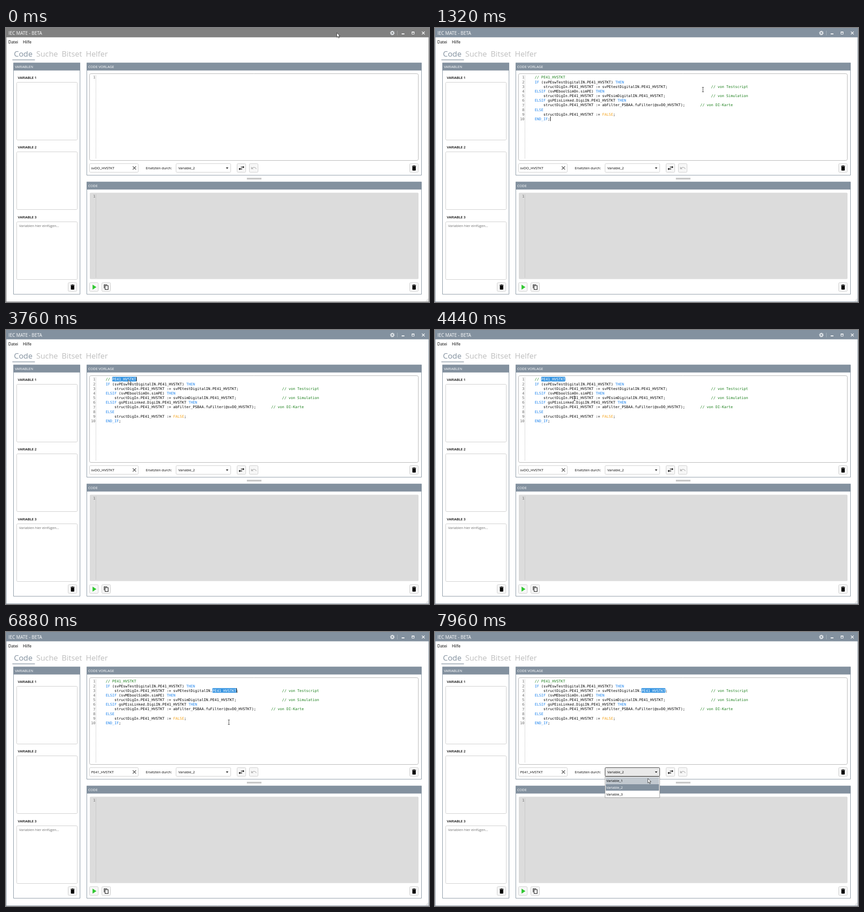
Animation, 929 px wide and 603 px high, one loop 8 s. Source, as an HTML page with a canvas:

```html
<!DOCTYPE html>
<html lang="de">
<head>
<meta charset="utf-8">
<title>IEC MATE - BETA</title>
<style>
html, body { margin: 0; width: 100%; height: 100%; overflow: hidden; background: #fff; }
canvas { display: block; }
</style>
</head>
<body>
<canvas id="stage" width="929" height="603"></canvas>
<script>
const ctx = document.getElementById('stage').getContext('2d');
const LOOP = 8000, STEP = 40, BLINK = 320;
const UI = '"Open Sans", "Noto Sans", sans-serif';
const MONO = '7.94px "DejaVu Sans Mono", "Noto Sans Mono", monospace';
const STEEL = '#83919f', LINE = '#cccccc', SMALL = 7.55;
const CODE_X = 199.9, CODE_Y = 103.1, CHAR = 4.782, ROW = 10.2;

// moments of the story
const FOCUS = 440, PASTE = 1320, DRAG = 2640, DRAG_END = 3480,
      CLICK = 5160, DOUBLE = 5280, FIND = 6880, OPEN = 7600;

const pad = ' '.repeat(4);
const note = (s, col, comment) => pad + s.padEnd(col) + '// von ' + comment;
const assign = 'structDigIn.PE41_HVSTKT := ';
const code = [
  '// PE41_HVSTKT',
  'IF (svPEswTestDigitalIN.PE41_HVSTKT) THEN',
  note(assign + 'svPEtestDigitalIN.PE41_HVSTKT;', 77, 'Testscript'),
  'ELSIF (svMEboolSimOn.simPE) THEN',
  note(assign + 'svPEsimDigitalIN.PE41_HVSTKT;', 77, 'Simulation'),
  'ELSIF gsPEisLinked.DigiIN.PE41_HVSTKT THEN',
  note(assign + 'abFilter_PSBAA.fuFilter(@svDO_HVSTKT);', 72, 'DI-Karte'),
  'ELSE',
  pad + assign + 'FALSE;',
  'END_IF;'
].map(s => pad + s);

// the tag is selected first in the comment, then in the third row
const TAG = 'PE41_HVSTKT';
const tagIn = row => {
  const from = code[row].lastIndexOf(TAG);
  return { row, from, to: from + TAG.length };
};
const firstTag = tagIn(0), secondTag = tagIn(2);

const icons = {
  swap: 'M21,9L17,5V8H10V10H17V13ZM7,11L3,15L7,19V16H14V14H7Z',
  undo: 'M12.5,8C9.8,8 7.5,9 5.6,10.6L2,7V16H11L7.4,12.4C13,8 19,11 20.2,16L22.5,15.2C21,11 17.1,8 12.5,8Z',
  trash: 'M19,4H15.5L14.5,3H9.5L8.5,4H5V6H19ZM6,7V19A2,2 0 0,0 8,21H16A2,2 0 0,0 18,19V7Z',
  play: 'M8,5V19L19,12Z',
  copy: 'M8,7H19V21H8ZM6,5V23H21V5ZM2,1V17H4V3H16V1Z'
};
for (const k in icons) icons[k] = new Path2D(icons[k]);
const arrow = new Path2D('M.5,.5V10.3L2.8,8.2L4.5,12L6.1,11.3L4.5,7.6H7.6Z');

// pointer moves, each easing out towards its end point
const start = { x: 726, y: 10 };
const moves = [
  { at: 80, for: 200, x: 588.5, y: 135.5 },
  { at: 1800, for: 800, x: 236.5, y: 109.5 },
  { at: DRAG, for: 840, x: 292.5, y: 107.5 },
  { at: DRAG_END, for: 840, x: 248, y: 111 },
  { at: 4320, for: 840, x: 467.5, y: 129.5, arc: 45 },
  { at: DOUBLE, for: 360, x: 473.5, y: 141.5 },
  { at: 5920, for: 160, x: 489.5, y: 198.5 },
  { at: FIND, for: 640, x: 484, y: 300 },
  { at: 7760, for: 200, x: 467, y: 322 }
];

// the caret restarts its blinking wherever it is placed
const carets = [
  { at: FOCUS, col: 0, row: 0 },
  { at: PASTE, col: code[9].length, row: 9 },
  { at: DRAG_END, col: firstTag.to, row: 0 },
  { at: CLICK, col: secondTag.from + 3, row: 2 },
  { at: DOUBLE + STEP, col: secondTag.to, row: 2 }
];

const colX = c => CODE_X + c * CHAR;
const rowY = r => CODE_Y + r * ROW;
const clamp = (v, a, b) => Math.max(a, Math.min(b, v));

function fill(x, y, w, h, color) {
  ctx.fillStyle = color;
  ctx.fillRect(x, y, w, h);
}

function round(x, y, w, h, r, color) {
  ctx.fillStyle = color;
  ctx.beginPath();
  ctx.roundRect(x, y, w, h, r);
  ctx.fill();
}

function box(x, y, w, h, stroke, bg = '#fff', r = 0) {
  round(x + .5, y + .5, w - 1, h - 1, r, bg);
  ctx.strokeStyle = stroke;
  ctx.lineWidth = 1;
  ctx.stroke();
}

function text(s, x, y, size, color = '#000', weight = 400) {
  ctx.font = `${weight} ${size}px ${UI}`;
  ctx.fillStyle = color;
  ctx.fillText(s, x, Math.round(y));
}

function lines(color, width, ...segs) {
  ctx.strokeStyle = color;
  ctx.lineWidth = width;
  ctx.beginPath();
  for (const [a, b, c, d] of segs) { ctx.moveTo(a, b); ctx.lineTo(c, d); }
  ctx.stroke();
}

function cross(x, y, r, color, width) {
  lines(color, width, [x - r, y - r, x + r, y + r], [x - r, y + r, x + r, y - r]);
}

function button(name, x, y, scale, color = '#000') {
  box(x, y, 20, 20, LINE, '#f7f7f7', 2);
  ctx.save();
  ctx.translate(x + 10.2, y + 10.2);
  ctx.scale(scale, scale);
  ctx.translate(-12, -12);
  ctx.fillStyle = color;
  ctx.fill(icons[name], 'evenodd');
  ctx.restore();
}

function gear(cx, cy) {
  ctx.fillStyle = '#dfe3e7';
  ctx.beginPath();
  for (let i = 0; i < 32; i++) {
    const a = (i + .5) * Math.PI / 16, r = i % 4 < 2 ? 5.2 : 3.9;
    ctx.lineTo(cx + r * Math.cos(a), cy + r * Math.sin(a));
  }
  ctx.closePath();
  ctx.moveTo(cx + 1.8, cy);
  ctx.arc(cx, cy, 1.8, 0, 7);
  ctx.fill('evenodd');
}

function group(title, x, y, w, h) {
  box(x, y, w, h, STEEL);
  fill(x, y, w, 17, STEEL);
  text(title, x + 3.5, y + 11.5, 7.75, '#fff');
}

function gutter(y, count) {
  ctx.setLineDash([1, 1]);
  lines('#b0b0b0', 1, [197.5, y, 197.5, y + 184]);
  ctx.setLineDash([]);
  ctx.font = MONO;
  ctx.fillStyle = '#666';
  ctx.textAlign = 'right';
  for (let i = 0; i < count; i++) ctx.fillText(i + 1, 196.3, Math.round(y + 7.3 + i * ROW));
  ctx.textAlign = 'left';
}

function titleBar(active) {
  const color = active ? STEEL : '#808080';
  box(0, 0, 929, 603, color);
  fill(0, 0, 929, 20.5, color);
  text('IEC MATE - BETA', 5.5, 15, 9.9, '#fff');
  gear(848.5, 11);
  fill(859, 6, 1, 10, active ? '#a6b0ba' : '#a0a0a0');
  fill(869, 12, 6, 2, '#fff');
  box(891, 8, 6, 6, '#fff', color);
  fill(891, 8, 6, 2, '#fff');
  cross(916.5, 11, 3, '#fff', 1.2);
}

function drawWindow(t) {
  titleBar(t >= FOCUS);
  text('Datei', 5, 34, 8.8);
  text('Hilfe', 37, 34, 8.8);
  let x = 17.5;
  for (const tab of ['Code', 'Suche', 'Bitset', 'Helfer']) {
    text(tab, x, 63, 16.9, x < 20 ? STEEL : '#bebebe');
    x += ctx.measureText(tab).width + 8.3;
  }
  fill(14, 69.5, 49.5, 1.4, STEEL);

  group('VARIABLEN', 16, 76.5, 147, 510);
  for (let i = 0; i < 3; i++) {
    const y = Math.round(119 + i * 153.4);
    text('VARIABLE ' + (i + 1), 26, y - 7, SMALL, '#000', 600);
    box(23, y, 134, 128, LINE, '#fff', 2);
  }
  text('Variablen hier einfügen...', 28.7, 438, SMALL, '#6c6c6c');
  button('trash', 136, 560, .62);

  group('CODE VORLAGE', 177, 76.5, 736, 248);
  box(183, 100, 723, 192, '#b2b2b2', '#fff', 3);
  gutter(104, t < PASTE ? 1 : code.length);
  box(183, 298, 108, 20, LINE, '#fff', 2);
  text(t < FIND ? 'svDO_HVSTKT' : TAG, 187, 311, 7.8);
  cross(282, 308, 3.6, '#555', 1.4);
  text('Ersetzten durch:', 307, 311, SMALL);
  button('swap', 507, 298, .67);
  button('undo', 534, 298, .58, '#b5b5b5');
  button('trash', 886, 298, .62);
  fill(529, 330, 32, 1, '#999');
  fill(529, 332, 32, 1, '#999');

  group('CODE', 177, 338.5, 736, 248);
  round(184, 362.5, 722, 190, 2, '#dcdcdc');
  gutter(366, 1);
  button('play', 183, 560, .78, '#32c832');
  button('copy', 210, 560, .52);
  button('trash', 886, 560, .62);

  for (let i = 0; i < 3; i++)
    for (let j = 0; j <= i; j++) fill(926 - 2 * j, 596 + 2 * i, 1, 1, '#aaa');
}

function pointerAt(t) {
  let { x, y } = start;
  for (const m of moves) {
    const u = clamp((t - m.at) / m.for, 0, 1);
    const k = m.at < PASTE ? u : u * (2 - u);
    x += (m.x - x) * k;
    y += (m.y - y) * k + (m.arc || 0) * 4 * k * (1 - k);
  }
  return { x, y };
}

function selectionAt(t, x) {
  if (t >= DOUBLE) return secondTag;
  if (t <= DRAG || t >= CLICK) return null;
  if (t >= DRAG_END) return firstTag;
  const end = Math.round((x - CODE_X) / CHAR);
  return { ...firstTag, to: clamp(end, firstTag.from, firstTag.to) };
}

function colorOf(word) {
  if (word.startsWith('//')) return '#1a7f1a';
  if (word === 'FALSE') return '#f5a31a';
  return /^(IF|THEN|ELSIF|ELSE|END_IF)$/.test(word) ? '#1e84ee' : '#000';
}

function drawCode(sel) {
  ctx.font = MONO;
  const base = row => Math.round(rowY(row) + 8.2);
  code.forEach((s, row) => {
    for (const m of s.matchAll(/\/\/.*|\w+|[^\s\w]/g)) {
      ctx.fillStyle = colorOf(m[0]);
      ctx.fillText(m[0], colX(m.index), base(row));
    }
  });
  if (!sel || sel.to <= sel.from) return;
  const x = colX(sel.from);
  round(x - .3, rowY(sel.row), (sel.to - sel.from) * CHAR + .6, ROW, 2, '#3996e2');
  ctx.fillStyle = '#fff';
  ctx.fillText(code[sel.row].slice(sel.from, sel.to), x, base(sel.row));
}

function drawCaret(t) {
  const c = carets.findLast(c => t >= c.at);
  if (!c || t >= OPEN || Math.floor((t - c.at) / BLINK) % 2) return;
  fill(Math.round(colX(c.col)), rowY(c.row), 1, 10, '#000');
}

function drawCombo(open, py) {
  box(373, 298, 121, 20, open ? '#333' : LINE, py >= 298 ? '#e9e9e9' : '#fff', 2);
  text('Variable_2', 378.5, 311, SMALL);
  ctx.fillStyle = '#000';
  ctx.beginPath();
  ctx.moveTo(483, 307);
  ctx.lineTo(488.4, 307);
  ctx.lineTo(485.7, 309.8);
  ctx.fill();
  if (!open) return;
  box(373, 318, 121, 47, '#999');
  for (let i = 0; i < 3; i++) {
    const y = 320 + i * 14.7, chosen = i === 1, hover = py >= y && py < y + 14.7;
    if (chosen || hover) fill(375, y, 117, 14.5, chosen ? STEEL : '#c1c8cf');
    text('Variable_' + (i + 1), 376.2, y + 10.4, SMALL, chosen ? '#fff' : '#000');
  }
}

function drawPointer({ x, y }, isArrow) {
  if (isArrow) {
    ctx.save();
    ctx.translate(Math.round(x), Math.round(y));
    ctx.fillStyle = '#fff';
    ctx.fill(arrow);
    ctx.strokeStyle = '#222';
    ctx.lineWidth = .8;
    ctx.stroke(arrow);
    ctx.restore();
    return;
  }
  x = Math.floor(x) + .5;
  y = Math.floor(y) + .5;
  lines('#333', .9, [x, y - 5, x, y + 5], [x - 2, y - 5, x + 2, y - 5], [x - 2, y + 5, x + 2, y + 5]);
}

function draw(t) {
  const p = pointerAt(t), sel = selectionAt(t, p.x);
  drawWindow(t);
  if (t >= PASTE) drawCode(sel);
  drawCaret(t);
  drawCombo(t >= OPEN, p.y);
  const overSel = sel && t > DRAG_END && t !== DOUBLE &&
    p.x > colX(sel.from) && p.x < colX(sel.to) &&
    p.y > rowY(sel.row) && p.y < rowY(sel.row + 1);
  drawPointer(p, p.y < 100 || p.y > 291 || overSel);
}

function tick(now) {
  draw(Math.floor(now % LOOP / STEP) * STEP);
  requestAnimationFrame(tick);
}
draw(0);
requestAnimationFrame(tick);
</script>
</body>
</html>
```
